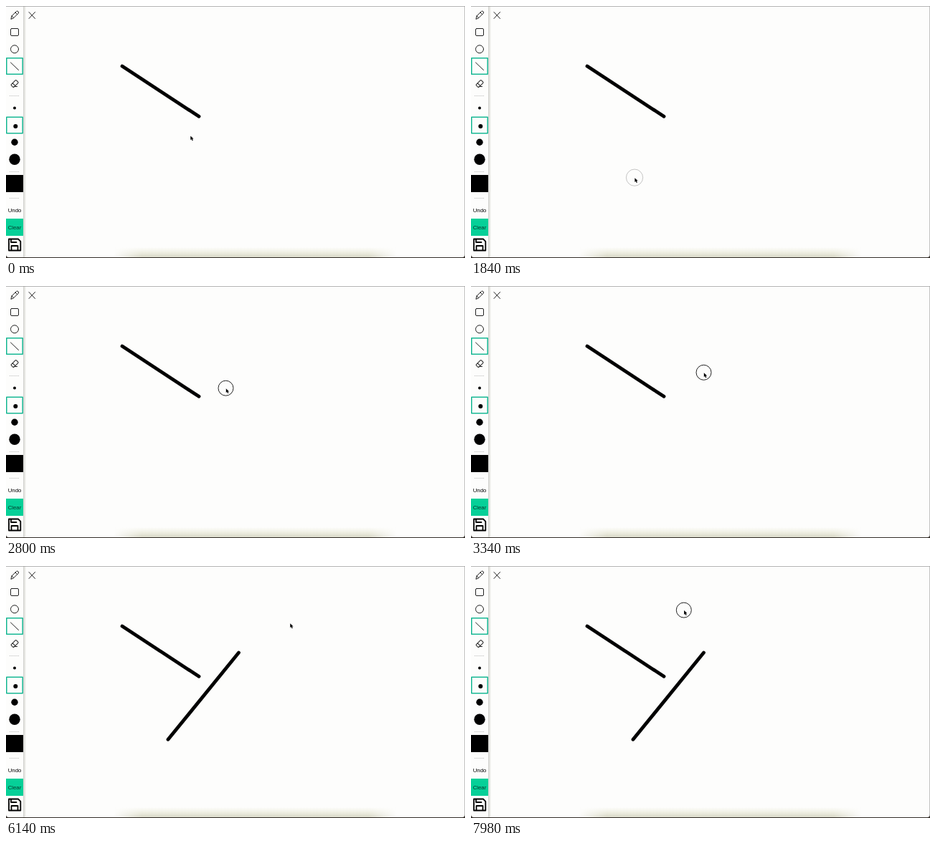
Recreate the animation shown at these times as an HTML page. Size 640 px wide and 352 px high, loop 8 s.

```html
<!DOCTYPE html>
<html lang="en">
<head>
<meta charset="utf-8">
<title>Drawing board</title>
<style>
html, body { margin: 0; width: 100%; height: 100%; overflow: hidden; background: #fdfdfc; }
svg { display: block; width: 100vw; height: 100vh; }
text { font: 7.8px "Liberation Sans", Arial, sans-serif; text-anchor: middle; }
.icon { fill: none; stroke: #222; stroke-width: 1; stroke-linejoin: round; stroke-linecap: round; }
.picked { fill: #fdfdfc; stroke: #18b894; stroke-width: 1.5; }
.rule { stroke: #aaa; stroke-width: .8; stroke-dasharray: 1 1; }
.ink { stroke: #000; stroke-width: 4.8; stroke-linecap: round; }
</style>
</head>
<body>
<svg viewBox="0 0 640 352" preserveAspectRatio="none">
  <defs>
    <linearGradient id="edge">
      <stop offset="0" stop-color="#d0d0cc"/>
      <stop offset="1" stop-color="#fbfbf8"/>
    </linearGradient>
    <linearGradient id="rise" x2="0" y2="1">
      <stop offset="0" stop-color="#e8e8c8" stop-opacity="0"/>
      <stop offset="1" stop-color="#d2d2c0" stop-opacity=".9"/>
    </linearGradient>
    <linearGradient id="sides">
      <stop offset="0" stop-color="#000"/>
      <stop offset=".1" stop-color="#fff"/>
      <stop offset=".9" stop-color="#fff"/>
      <stop offset="1" stop-color="#000"/>
    </linearGradient>
    <mask id="fade"><rect x="150" y="330" width="395" height="22" fill="url(#sides)"/></mask>
  </defs>

  <rect width="640" height="352" fill="#fdfdfc"/>
  <rect x="150" y="337" width="395" height="14" fill="url(#rise)" mask="url(#fade)"/>
  <rect x="24" width="4" height="351" fill="url(#edge)"/>

  <g class="icon">
    <path d="M7 18l1-4 6.5-6.5q1.3-1 2.5.2t.2 2.5L10.700 16.700zM13 9l2.800 2.800M8 14l2.700 2.700"/>
    <rect x="6.500" y="31.500" width="11" height="10" rx="1.500"/>
    <circle cx="12" cy="60.300" r="5.500"/>
    <rect class="picked" x=".8" y="72.800" width="22.400" height="22.400"/>
    <path d="M6.500 79l11 10.500"/>
    <g transform="rotate(-45 12 108.500)">
      <rect x="7" y="106" width="10" height="5.200" rx="1"/>
      <path d="M10.500 106v5.200"/>
    </g>
    <path d="M11 112.500h4.500"/>
    <rect class="picked" x=".8" y="155.300" width="22.400" height="22.400"/>
    <path d="M32 8.500l8.500 9M40.500 8.500l-8.500 9"/>
    <path stroke="#000" stroke-width="1.800" d="M4 325.500h13l3.300 3.300V341.500H4zM7 325.500v4.500h7.500M7.500 341.500v-6.500h9v6.500"/>
  </g>
  <path class="rule" d="M5 125.500h14M5 231.500h14M5 268.500h14"/>
  <circle cx="12" cy="142.500" r="2"/>
  <circle cx="13.300" cy="168" r="3"/>
  <circle cx="12" cy="190.300" r="4.700"/>
  <circle cx="12" cy="214.300" r="7.700"/>
  <rect y="236" width="24" height="24"/>
  <text x="12" y="288.200">Undo</text>
  <rect y="297" width="24" height="24" fill="#06d098"/>
  <text x="12" y="312" fill="#053a2c">Clear</text>

  <path class="ink" d="M162 84L269 154.300"/>
  <path class="ink" id="stroke" d="M226 242.300L324.500 121"/>
  <circle id="ring" fill="none" stroke="#222"/>
  <path id="cursor" d="M0 0v5.800l1.300-1.200 1.100 2.300 1.200-.5-1.100-2.200h1.900z" stroke="#fff" stroke-width=".8" paint-order="stroke"/>

  <path d="M0 .4H640" stroke="#999" stroke-width=".8"/>
  <path d="M639.600 0V352" stroke="#aaa" stroke-width=".8"/>
  <path d="M0 347q0 4 4 4H636q4 0 4-4V352H0z" fill="#332d28"/>
</svg>
<script>
const LOOP = 8000;
const el = id => document.getElementById(id);

// Pointer path: time, x, y
const path = [
  [0, 257, 181], [400, 240, 215], [820, 228, 240], [960, 227, 242],
  [1560, 226, 242.5], [1820, 226, 242.5],
  [2260, 268.5, 187], [2540, 294, 158.5], [3000, 316, 131], [3340, 324.5, 121],
  [5060, 324.5, 121], [5460, 364, 98], [5860, 396, 80],
  [6140, 396, 80], [6880, 345, 75], [7720, 296.8, 61.8], [LOOP, 296.8, 61.8]
];

const clamp = v => Math.max(0, Math.min(1, v));

function pointer(t) {
  const i = path.findIndex(p => p[0] > t);
  const [a, b] = [path[i - 1], path[i]];
  const k = (t - a[0]) / (b[0] - a[0]);
  return [1, 2].map(n => a[n] + (b[n] - a[n]) * k);
}

// The ring settles in on a press and spreads out on a release.
function press(t) {
  if (t >= 7800) return clamp((t - 7800) / 160);
  return clamp((t - 1800) / 160) * (1 - clamp((t - 3460) / 320));
}

function draw(now) {
  const t = now % LOOP;
  const [x, y] = pointer(t);
  const p = press(t);
  el("cursor").setAttribute("transform", `translate(${x + .3} ${y + .3})`);
  el("ring").setAttribute("cx", x);
  el("ring").setAttribute("cy", y - .2);
  el("ring").setAttribute("r", 12 - 1.5 * p);
  el("ring").style.opacity = p;
  el("stroke").style.visibility = t >= 3520 ? "visible" : "hidden";
  requestAnimationFrame(() => draw(performance.now() - start));
}

const start = performance.now();
draw(0);
</script>
</body>
</html>
```
